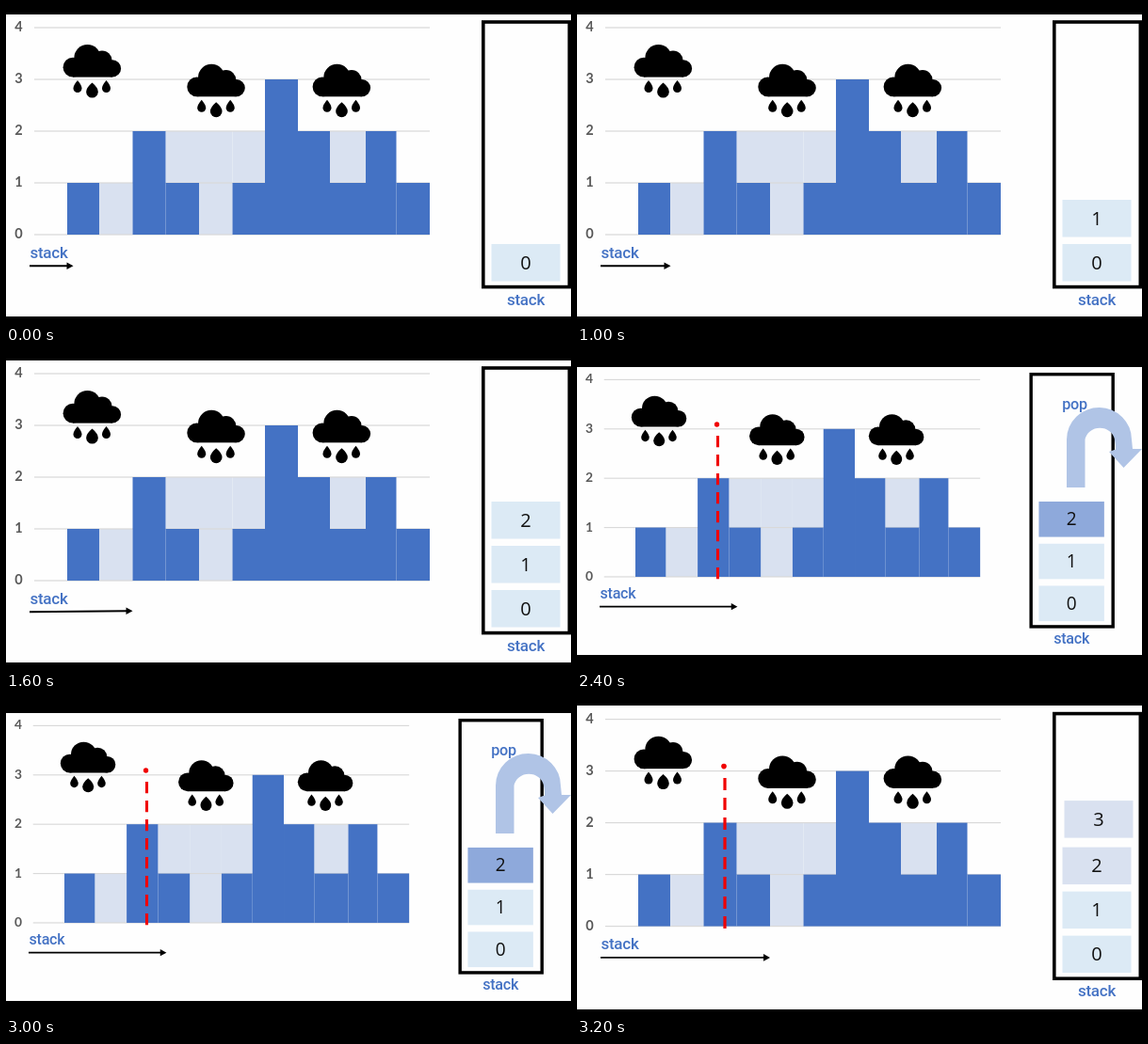
Recreate the animation shown at these times as an HTML page. Size 600 px wide and 338 px high, loop 4 s.

```html
<!DOCTYPE html>
<html lang="en">
<head>
<meta charset="utf-8">
<title>Rain water stack</title>
<style>
html, body { margin: 0; width: 100%; height: 100%; overflow: hidden; background: #000; }
svg { display: block; width: 100vw; height: 100vh; }
text { text-anchor: middle; }
.axis { font: 700 14.5px Lato, sans-serif; fill: #595959; }
.num { font: 400 20px "Open Sans", sans-serif; fill: #111; }
.word { font: 500 17px Roboto, sans-serif; letter-spacing: -.3px; fill: #4472c4; }
</style>
</head>
<body>
<svg id="stage" viewBox="0 0 600 338" preserveAspectRatio="none"></svg>
<script>
const stage = document.getElementById('stage');
const LOOP = 4000;
const BLUE = '#4472c4', LIGHT = '#d9e1f0', PALE = '#dceaf5', POPPED = '#8ea9db';

// Each slide: paper top and bottom, view, arrow end, stack cells, extras.
const FULL = '', SMALL = 'matrix(.951 0 0 .9525 .2 7.5)';
const slides = [
  { at: 0, paper: [9, 330], view: FULL, end: 71.5, cells: [PALE] },
  { at: 800, paper: [9, 330], view: FULL, end: 99.5, cells: [PALE, PALE] },
  { at: 1600, paper: [9, 330], view: FULL, end: 134.5, tilt: 1, cells: [PALE, PALE, PALE] },
  { at: 2400, paper: [16, 322], view: SMALL, end: 179, cells: [PALE, PALE, POPPED], mark: true, pop: true },
  { at: 3200, paper: [8, 331], view: 'translate(0 -.4)', end: 205, cells: [PALE, PALE, LIGHT, LIGHT], mark: true }
];

const edges = [65, 99, 134.5, 169.5, 205, 240.5, 275, 310, 344, 382, 414.5, 450];
const heights = [1, 0, 2, 1, 0, 1, 3, 2, 1, 2, 1];
const water = [0, 1, 0, 1, 2, 1, 0, 0, 1, 0, 0];
const level = n => 243 - 55 * n;

const rect = (x, y, w, h, fill) => `<rect x="${x}" y="${y}" width="${w}" height="${h}" fill="${fill}"/>`;
const text = (cls, x, y, s) => `<text class="${cls}" x="${x}" y="${y}">${s}</text>`;
const circle = (x, y, r) => `<circle cx="${x}" cy="${y}" r="${r}"/>`;

function drop(x, top, r, h) {
  const y = top + h - r;
  return `<path d="M${x} ${top}Q${x + r} ${y - r * .7} ${x + r} ${y}A${r} ${r} 0 0 1 ${x - r} ${y}Q${x - r} ${y - r * .7} ${x} ${top}Z"/>`;
}

function cloud(dx, dy) {
  return `<g transform="translate(${dx} ${dy})">` +
    circle(71, 65.2, 10.4) + circle(86.5, 55.3, 14.2) + circle(102, 58, 10.6) + circle(113, 66.4, 9.1) +
    rect(71, 58, 42, 17.6, '#000') +
    drop(76, 79, 4.5, 13) + drop(91.5, 81.5, 6.3, 16) + drop(106.5, 79, 4.5, 13) + '</g>';
}

function chart() {
  let out = '';
  heights.forEach((n, i) => {
    const x = edges[i], w = edges[i + 1] - x;
    if (water[i]) out += rect(x, level(n + water[i]), w, 55 * water[i], LIGHT);
  });
  for (let n = 0; n <= 4; n++) {
    out += rect(30, level(n) - .6, 420, 1.2, '#d9d9d9') + text('axis', 13.5, level(n) + 4.3, n);
  }
  heights.forEach((n, i) => {
    if (n) out += rect(edges[i], level(n), edges[i + 1] - edges[i], 55 * n, BLUE);
  });
  return out + cloud(0, 0) + cloud(131.7, 20.7) + cloud(265, 20.7);
}

function pointer(end, tilt = 0) {
  const y = 276.3 - tilt;
  return `<path d="M25 276.3L${end - 5} ${y}" stroke="#000" stroke-width="1.9"/>` +
    `<path d="M${end} ${y}l-7 -3.8v7.6z"/>`;
}

function stack(cells) {
  let out = '<rect x="506.8" y="17" width="91.5" height="281.6" fill="none" stroke="#000" stroke-width="3.6"/>';
  cells.forEach((fill, i) => {
    const dx = i === 3 ? 2 : 0, y = 253 - 47 * i - (i === 3 ? 2.5 : 0);
    out += rect(515.5 + dx, y, 73, 39.5, fill) + text('num', 552 + dx, y + 26.8, i);
  });
  return out + text('word', 552, 317.5, 'stack');
}

const marker = '<g fill="#f00000">' + circle(156, 73, 2.8) + '</g>' +
  '<path d="M157 85.5V247" stroke="#f00000" stroke-width="3.2" stroke-dasharray="13 8"/>';

const popArrow = text('word', 555.5, 56.3, 'pop');
const turn = '<path fill="#b0c4e6" d="M520 144V93A34.5 34 0 0 1 555 59A34.5 34 0 0 1 589 93L590 103H600L580.5 123L565 106L572 103.5' +
  'Q572 98 571 93A16 15 0 0 0 539.5 93V144Z"/>';

function build(s) {
  const [top, bottom] = s.paper;
  return '<g visibility="hidden">' + rect(0, top, 600, bottom - top, '#fefefe') +
    `<g transform="${s.view}">` + chart() + text('word', 45.5, 267.5, 'stack') +
    pointer(s.end, s.tilt) + stack(s.cells) +
    (s.mark ? marker : '') + (s.pop ? popArrow : '') + '</g>' + (s.pop ? turn : '') + '</g>';
}

stage.innerHTML = rect(0, 0, 600, 338, '#000') + slides.map(build).join('');
const layers = [...stage.children].slice(1);

function show() {
  const t = performance.now() % LOOP;
  const now = slides.filter(s => s.at <= t).length - 1;
  layers.forEach((g, i) => g.setAttribute('visibility', i === now ? 'visible' : 'hidden'));
  requestAnimationFrame(show);
}
show();
</script>
</body>
</html>
```
